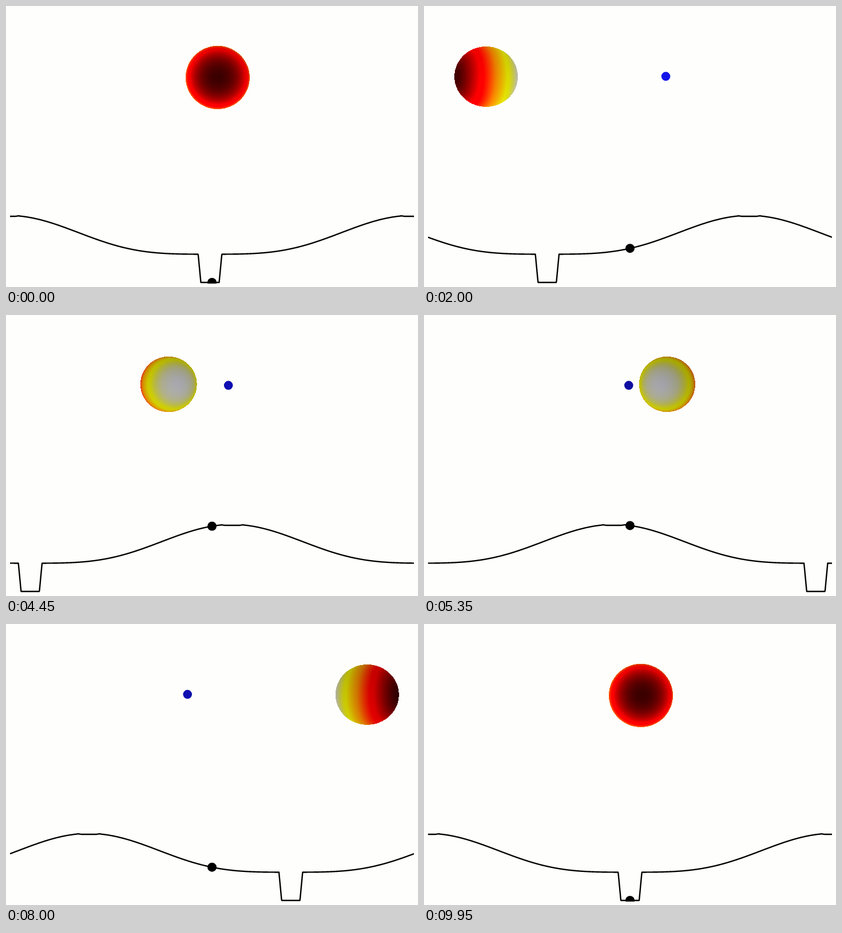
Recreate the animation shown at these times as an HTML page with a canvas. Size 720 by 493 pixels, loop 10000 ms.

```html
<!DOCTYPE html>
<html lang="en">
<head>
<meta charset="utf-8">
<title>Planet phase curve</title>
<style>
html, body { margin: 0; width: 100%; height: 100%; overflow: hidden; background: #fefefc; }
canvas { display: block; }
</style>
</head>
<body>
<canvas id="stage" width="720" height="493"></canvas>
<script>
const LOOP = 10000, STEP = 50;
const LEFT = 7, RIGHT = 713, SPAN = RIGHT - LEFT, NOW_X = 360;
const CENTER_X = 369.9, PERSPECTIVE = 0.068;
const ctx = document.getElementById('stage').getContext('2d');

const SIZE = 128;
const disc = document.createElement('canvas');
disc.width = disc.height = SIZE;
const discCtx = disc.getContext('2d');

// Temperature colours by cosine of the angle to the substellar point
const HEAT = [
  [-1, 60, 0, 0], [-0.5, 250, 0, 0], [-0.38, 255, 0, 0], [-0.25, 255, 40, 0],
  [0, 242, 132, 0], [0.4, 226, 224, 0], [0.5, 222, 222, 10],
  [0.68, 205, 205, 90], [0.82, 198, 198, 155], [1, 198, 198, 206]
];

function heatColor(m) {
  let i = 1;
  while (i < HEAT.length - 1 && m > HEAT[i][0]) i++;
  const a = HEAT[i - 1], b = HEAT[i];
  const k = Math.min(1, Math.max(0, (m - a[0]) / (b[0] - a[0])));
  return [1, 2, 3].map(c => a[c] + (b[c] - a[c]) * k);
}

function drawPlanet(sin, cos) {
  const scale = 1 / (1 - PERSPECTIVE * cos);
  const ry = 51.8 * scale;
  const rx = ry * Math.sqrt(1.016 * cos * cos + 1.106 * sin * sin);
  const cx = CENTER_X - 269 * sin * scale;
  const cy = 123.3 + 29 * (scale - 1);
  const x0 = Math.round(cx) - SIZE / 2, y0 = Math.round(cy) - SIZE / 2;
  const image = discCtx.createImageData(SIZE, SIZE);
  const light = 0.9 + 0.07 * cos + 0.08 * sin;

  for (let y = 0; y < SIZE; y++) {
    for (let x = 0; x < SIZE; x++) {
      const nx = (x0 + x + 0.5 - cx) / rx, ny = (y0 + y + 0.5 - cy) / ry;
      const r2 = nx * nx + ny * ny;
      if (r2 > 1) continue;
      const facing = nx * sin - Math.sqrt(1 - r2) * cos;
      const shade = light + 0.07 * ny - 0.05 * nx;
      const rgb = heatColor(facing);
      const p = (y * SIZE + x) * 4;
      for (let c = 0; c < 3; c++) image.data[p + c] = rgb[c] * shade;
      image.data[p + 3] = 255;
    }
  }
  discCtx.putImageData(image, 0, 0);
  ctx.drawImage(disc, x0, y0);
}

function dot(x, y, r, color) {
  ctx.fillStyle = color;
  ctx.beginPath();
  ctx.arc(x, y, r, 0, 2 * Math.PI);
  ctx.fill();
}

function drawStar(sin, cos) {
  const blue = Math.round(196 + 29 * cos + 30 * sin);
  const dim = Math.round(blue * 0.085);
  dot(CENTER_X + 55.4 * sin, 123.4, 7.8, `rgb(${dim},${dim},${blue})`);
}

// Brightness at horizontal distance u from the transit centre
function curveY(u) {
  const d = Math.abs(u - SPAN * Math.round(u / SPAN));
  if (d < 16) return 485;
  if (d < 20.7) return 485 - 49.5 * (d - 16) / 4.7;
  const fromTop = SPAN / 2 - d;
  if (fromTop < 19.8) return 369 - Math.max(0, (fromTop - 13) / 6.8);
  const s = (1 - Math.cos(2 * Math.PI * d / SPAN)) / 2;
  return 435.5 - s * (3.5 + 72.5 * s - 8 * s * s);
}

function drawCurve(t) {
  const transitX = 356.5 - SPAN * t / LOOP;
  ctx.save();
  ctx.beginPath();
  ctx.rect(LEFT, 0, SPAN, 487);
  ctx.clip();
  ctx.beginPath();
  for (let x = LEFT; x <= RIGHT; x += 0.5) ctx.lineTo(x, curveY(x - transitX));
  ctx.strokeStyle = '#000';
  ctx.lineWidth = 2.4;
  ctx.lineJoin = 'round';
  ctx.stroke();
  dot(NOW_X, curveY(NOW_X - transitX), 8, '#000');
  ctx.restore();
}

function draw(t) {
  const angle = 2 * Math.PI * t / LOOP;
  const sin = Math.sin(angle), cos = Math.cos(angle);
  ctx.fillStyle = '#fefefc';
  ctx.fillRect(0, 0, 720, 493);
  const bodies = cos > 0 ? [drawStar, drawPlanet] : [drawPlanet, drawStar];
  bodies.forEach(body => body(sin, cos));
  drawCurve(t);
}

let start = null, shown = -1;
function tick(now) {
  if (start === null) start = now;
  const t = Math.floor(((now - start) % LOOP) / STEP) * STEP;
  if (t !== shown) draw(shown = t);
  requestAnimationFrame(tick);
}
draw(0);
requestAnimationFrame(tick);
</script>
</body>
</html>
```
